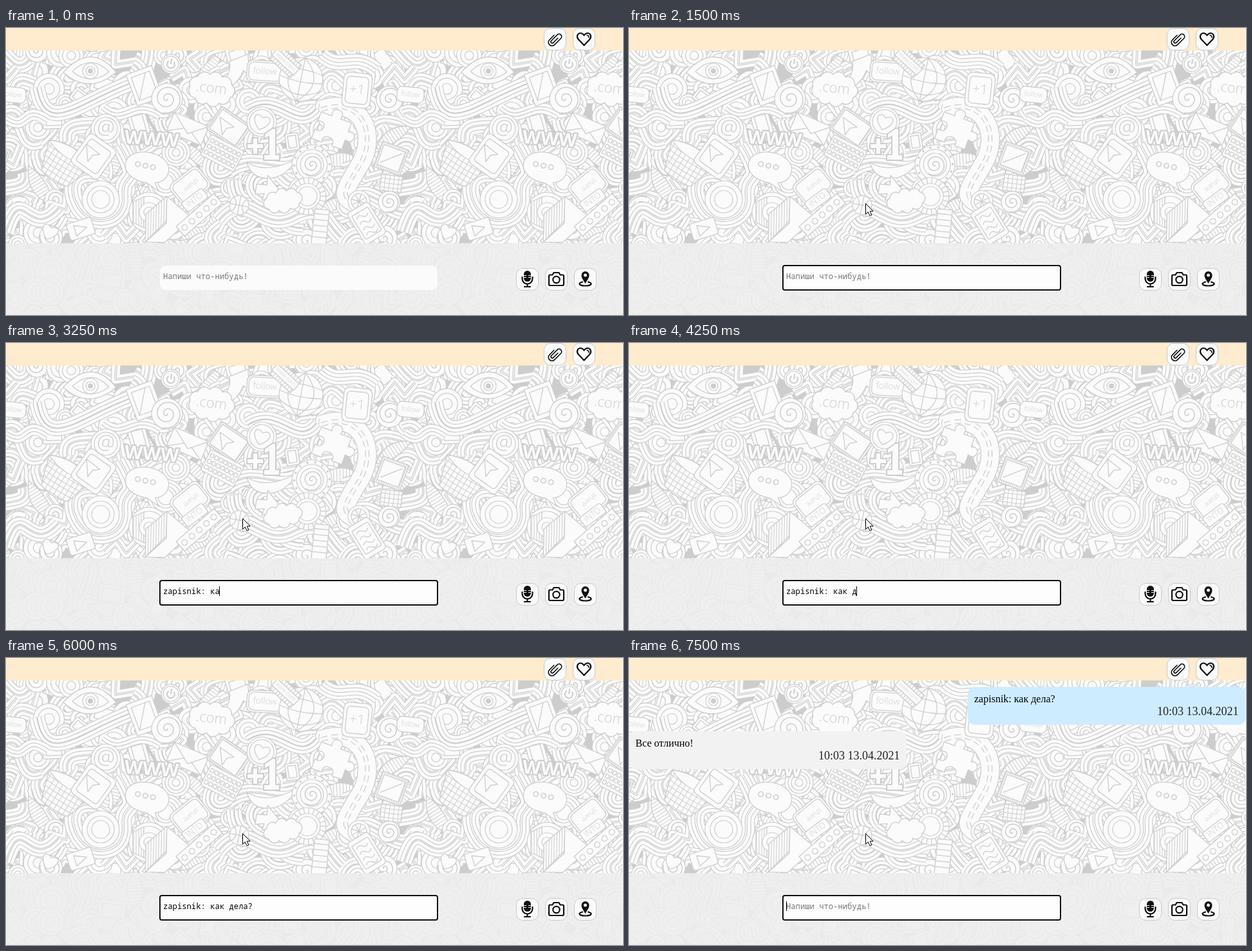
An HTML page with a canvas for the animation above (8 s loop, 958 by 447 pixels).

```html
<!DOCTYPE html>
<html lang="ru">
<head>
<meta charset="utf-8">
<style>
  html, body { margin: 0; width: 100%; height: 100%; overflow: hidden; background: #fbfbfb; }
  canvas, svg { position: absolute; left: 0; top: 0; display: block; }
  .mono { font: 12.2px "Noto Sans Mono", monospace; white-space: pre; }
  .serif { font: 16px "Liberation Serif", serif; }
  .time { font-size: 18px; fill: #222; text-anchor: end; }
  .line { fill: none; stroke: #111; stroke-width: 2.2; stroke-linecap: round; stroke-linejoin: round; }
  .thin { stroke-width: 1.6; }
</style>
</head>
<body>
<canvas id="doodles" width="957" height="447"></canvas>
<svg width="958" height="447" viewBox="0 0 958 447">
  <defs>
    <rect id="button" x=".5" y=".5" width="34" height="34" rx="10" fill="#fafafa" stroke="#c9c9c9"/>
  </defs>
  <rect width="957" height="35" fill="#ffebcd"/>
  <rect y="335" width="957" height="112" fill="#eee" opacity=".9"/>

  <g transform="translate(835 0)">
    <use href="#button"/>
    <path class="line thin" transform="translate(17 18) rotate(45)"
      d="M-5.500-4V6a5.500 5.500 0 0 0 11 0V-8a4 4 0 0 0-8 0V5a2.200 2.200 0 0 0 4.400 0V-5"/>
  </g>
  <g transform="translate(880 0)">
    <use href="#button"/>
    <path class="line" d="M17.500 27L8.500 17.500C5 13 8 8 12 8C15 8 16.500 10 17.500 11.500C18.500 10 20 8 23 8C27 8 30 13 26.500 17.500Z"/>
    <path class="line thin" d="M22 11.300q3 .5 3 3.500"/>
  </g>
  <g transform="translate(792 374)">
    <use href="#button"/>
    <rect x="12" y="4" width="11" height="17" rx="5.500" fill="#111"/>
    <path d="M12 11.500h4M19 11.500h4M12 14.500h4M19 14.500h4" stroke="#fafafa"/>
    <path class="line" d="M9.500 14v2.500a8 8 0 0 0 16 0V14M17.500 25v4M13 29h9"/>
  </g>
  <g transform="translate(837 374)">
    <use href="#button"/>
    <path class="line" d="M8 10.500h3.500l2-3.500h8l2 3.500H27q2 0 2 2V25q0 2-2 2H8q-2 0-2-2V12.500q0-2 2-2z"/>
    <circle class="line" cx="17.500" cy="18" r="5.200"/>
  </g>
  <g transform="translate(882 374)">
    <use href="#button"/>
    <path class="line" d="M13 21.500c-8 2-5 6 4.500 6s12.500-4 4.500-6"/>
    <path fill="#111" fill-rule="evenodd" d="M17.500 24C14 18 11.500 15 11.500 11a6 6 0 0 1 12 0C23.500 15 21 18 17.500 24ZM15 11a2.500 2.500 0 0 0 5 0a2.500 2.500 0 0 0-5 0Z"/>
  </g>

  <rect id="idle" x="239" y="370" width="431" height="38" rx="9" fill="#fbfbfb"/>
  <rect id="focus" x="239" y="370" width="431" height="38" rx="3" fill="#fdfdfd" stroke="#101010" stroke-width="2"/>
  <text id="field" class="mono" x="244" y="391"></text>
  <rect id="caret" y="379" width="1" height="15"/>

  <g id="chat" class="serif">
    <rect x="526" y="45" width="431" height="59" rx="10" fill="#ceecff"/>
    <text x="536" y="69">zapisnik: как дела?</text>
    <text class="time" x="946.500" y="89">10:03 13.04.2021</text>
    <rect y="114" width="431" height="59" rx="10" fill="#f2f2f2"/>
    <text x="10" y="138">Все отлично!</text>
    <text class="time" x="420.500" y="158">10:03 13.04.2021</text>
  </g>
  <path id="pointer" d="M.5.5V17L4.300 13.400L7 19.500L9.800 18.300L7.200 12.300H12Z" fill="#fff" stroke="#000"/>
</svg>
<script>
const $ = id => document.getElementById(id);
const c = $('doodles').getContext('2d');
const INK = '#cdcdcd', PAPER = '#fbfbfb', TILE = 618;

let seed = 11;
const rnd = (a = 1, b = 0) => b + (a - b) * ((seed = seed * 16807 % 2147483647) / 2147483647);

// Every motif is repeated once per wallpaper tile.
function put(x, y, angle, draw) {
  for (const dx of [-TILE, 0, TILE]) {
    c.save();
    c.translate(x + dx, y);
    c.rotate(angle);
    draw();
    c.restore();
  }
}
const asPath = p => typeof p === 'string' ? new Path2D(p) : p;
function line(p, width = 1.3, color = INK) {
  c.strokeStyle = color;
  c.lineWidth = width;
  c.stroke(asPath(p));
}
function outline(p, width) {
  c.fillStyle = PAPER;
  c.fill(asPath(p));
  line(p, width);
}
function disc(x, y, r, color = INK) {
  c.fillStyle = color;
  c.beginPath();
  c.arc(x, y, r, 0, 7);
  c.fill();
}
function rings(...radii) {
  for (const r of radii) { disc(0, 0, r + .6); disc(0, 0, r - .6, PAPER); }
}
function box(w, h, r = 0) {
  const p = new Path2D();
  p.roundRect(-w / 2, -h / 2, w, h, r);
  return p;
}
// A striped ribbon: nested strokes in alternating tones.
function tube(p, width) {
  p = asPath(p);
  for (let w = width, dark = true; w > 0; w -= dark ? 2.4 : 9, dark = !dark) line(p, w, dark ? INK : PAPER);
}
function hatch(p, step = 4) {
  p = asPath(p);
  outline(p);
  c.save();
  c.clip(p);
  for (let x = -80; x < 80; x += step) line(`M${x} -80V80`, 1);
  c.restore();
}
function mesh(p, step) {
  hatch(p, step);
  c.save();
  c.clip(asPath(p));
  for (let y = -60; y < 60; y += step) line(`M-60 ${y}Q0 ${y + 9} 60 ${y}`, 1);
  c.restore();
}
function spiral(r, turns = 2.3) {
  const p = new Path2D();
  for (let a = 0; a < turns * 6.283; a += .2) {
    const k = r * a / (turns * 6.283);
    p.lineTo(k * Math.cos(a), k * Math.sin(a));
  }
  return p;
}
function curl(r) { rings(r); line(spiral(r - 1), 1.5); }
function cloud(rx, ry, bumps, r) {
  for (const inset of [0, 1.4]) {
    const color = inset ? PAPER : INK;
    for (let i = 0; i < bumps; i++) {
      const a = i / bumps * 6.283;
      disc(rx * Math.cos(a), ry * Math.sin(a), r - inset, color);
    }
    c.beginPath();
    c.ellipse(0, 0, rx, ry, 0, 0, 7);
    c.fill();
  }
}
function label(text, size, bold) {
  c.font = `${bold ? 'bold' : 300} ${size}px "Open Sans", sans-serif`;
  c.textAlign = 'center';
  c.textBaseline = 'middle';
  if (bold) { c.strokeStyle = INK; c.lineWidth = 4; c.strokeText(text, 0, 0); }
  c.fillStyle = bold ? PAPER : INK;
  c.fillText(text, 0, 0);
}
const heart = 'M0 13C-20 -1 -12 -16 0 -6C12 -16 20 -1 0 13Z';
const arrow = 'M-10 -13L13 0L2 3L-4 14Z';

const fillers = [
  r => rings(r, r * .7, r * .35),
  r => curl(r),
  r => tube(`M${-2 * r} 0C${-r} ${-2 * r} ${r} ${2 * r} ${2 * r} 0`, 26),
  r => tube(`M${-r} ${r}C${-r} ${-r} ${r} ${-r} ${r} ${r}`, 25),
  r => hatch(`M${-1.6 * r} 0Q0 ${-r * 1.3} ${1.6 * r} 0Q0 ${r * .7} ${-1.6 * r} 0`, 5),
  r => tube(`M${-1.5 * r} 0L${-r * .4} ${-r * .7}L${r * .1} ${r * .5}L${1.4 * r} ${-r * .4}`, 15),
  r => { outline(box(r * 1.7, r * 1.3, 3)); outline(box(r * 1.2, r * .8)); }
];

function wallpaper() {
  c.fillStyle = INK;
  c.fillRect(0, 0, 957, 447);
  c.lineJoin = 'round';
  // Two passes over a jittered grid leave only small solid gaps.
  const cols = 19, rows = 14, count = cols * rows;
  for (let i = 0; i < count * 2; i++) {
    const k = i * 89 % count, r = rnd(25, 14);
    const kind = fillers[Math.floor(rnd(fillers.length))];
    put((k % cols + rnd()) * TILE / cols, (Math.floor(k / cols) + rnd()) * 34, rnd(6.283), () => kind(r));
  }

  // Long ribbons that weave through the tile.
  for (const [path, width] of [
    ['M48 92C62 175 118 110 205 82', 25],
    ['M176 182C215 250 178 220 182 262S130 315 110 275S120 215 155 235', 27],
    ['M0 318C25 235 35 335 82 280', 26],
    ['M345 222C395 185 425 245 478 190', 26],
    ['M375 128C425 95 450 165 482 125', 25],
    ['M330 300C375 245 395 320 445 294S495 305 520 326', 26],
    ['M150 125C185 155 195 105 240 135', 18],
    ['M575 65C540 35 520 70 490 42', 24],
    ['M0 140C35 165 25 115 65 145', 18]
  ]) put(0, 0, 0, () => tube(path, width));

  put(0, 0, 0, () => {
    const road = new Path2D('M490 127C550 105 578 165 550 212S518 262 548 276');
    line(road, 30);
    line(road, 27.500, PAPER);
    c.setLineDash([10, 6]);
    line(road, 7);
    line(road, 4.500, PAPER);
    c.setLineDash([]);
  });

  put(131, 67, .05, () => {
    outline('M-42 4Q0 -46 40 0Q0 38 -42 4');
    outline('M-28 2Q0 -28 29 0Q0 24 -28 2');
    rings(12, 7); disc(0, 0, 4);
  });
  put(256, 56, .15, () => { rings(15, 12); line('M-4 -4A6 6 0 1 0 4 -4M0 -8V0', 2); });
  put(215, 90, -.35, () => { outline(box(42, 52)); outline(box(30, 38)); line('M-15 19L8 -19'); });
  put(250, 110, 0, () => curl(24));
  put(354, 72, .5, () => outline('M-12 36Q-2 0 -16 -14L4 -38L22 -10L10 -12Q14 20 -12 36Z'));
  put(319, 95, .12, () => { cloud(25, 16, 9, 12); label('.com', 22); });
  put(402, 68, .06, () => { outline(box(56, 34, 9)); outline(box(50, 28, 7)); label('follow', 14); });
  put(628, 104, .1, () => { outline(box(42, 24, 8)); label('follow', 11); });
  put(458, 80, .2, () => {
    rings(34);
    for (const k of [-20, 0, 20]) line(`M0 -34Q${k * 2} 0 0 34M-34 ${k * .6}Q0 ${k * 1.4 + 8} 34 ${k * .6}`);
  });
  put(434, 53, .75, () => { hatch(box(44, 26), 5); outline(box(46, 13)); label('www.com', 9); });
  put(545, 97, .1, () => { outline(box(44, 54, 9)); outline(box(34, 42, 6)); label('+1', 21); });

  put(155, 157, .1, () => { rings(23, 18); label('@', 31); });
  put(91, 208, .55, () => { mesh('M-38 -16Q0 -34 38 -16L25 30Q0 40 -24 30Z', 8); outline('M-38 -16Q0 -34 38 -16Q0 2 -38 -16Z'); });
  put(136, 200, .62, () => { outline(box(52, 56, 7)); outline(box(40, 42, 5)); });
  put(133, 195, .15, () => outline(arrow));
  put(264, 194, 0, () => rings(22, 17, 12, 6));
  put(282, 157, .4, () => { outline(box(58, 32, 2)); line('M-29 -16L3 7L29 -16M-29 16L-5 1M29 16L8 3'); });
  put(226, 175, .07, () => label('WWW', 29, true));
  put(248, 240, 0, () => { rings(28, 23); rings(17, 12); });
  put(219, 217, .2, () => {
    outline('M-34 0C-34 -31 34 -31 34 0C34 13 25 19 17 21L25 33L5 24C-20 25 -34 14 -34 0Z');
    for (const x of [-15, -3, 9]) { disc(x, -2, 4.500); disc(x, -2, 3, PAPER); }
  });
  put(147, 267, 0, () => rings(29, 21, 14));
  put(222, 287, 0, () => { rings(31, 25); hatch('M-25 -16L-8 -24V24L-25 16Z'); rings(15, 8); });
  put(245, 300, .02, () => { hatch('M-28 -10L4 -38V0L-28 34Z'); outline('M4 -38L44 -5L2 34L-28 34L4 4Z'); });
  put(286, 246, -.68, () => { outline(box(56, 42, 9)); outline(box(49, 35, 7)); });
  put(287, 244, 2.450, () => label('share', 11));
  put(293, 268, -.65, () => { outline(box(40, 18, 4)); label('INTO', 13); });
  put(300, 291, -.72, () => {
    outline(box(78, 20));
    for (let x = -30; x < 36; x += 15) { disc(x, 0, 5); disc(x, 0, 3.700, PAPER); }
  });
  put(68, 317, .4, () => outline(heart));
  put(116, 313, -.3, () => { outline(box(40, 27, 4)); outline('M-9 -8L10 0L-9 9Z'); });

  put(346, 155, .6, () => { hatch(box(56, 43, 3), 3); outline(box(48, 36, 2)); });
  put(341, 153, .1, () => outline(arrow));
  put(336, 195, .48, () => {
    outline(box(58, 36, 3));
    for (let i = 0; i < 21; i++) {
      c.save();
      c.translate(-23 + i % 7 * 7.700, -10 + Math.floor(i / 7) * 10);
      outline(box(5.500, 6, 1));
      c.restore();
    }
  });
  put(397, 146, .3, () => { rings(23, 19); outline(heart); });
  put(404, 217, 0, () => outline('M-30 -8Q0 12 48 -14Q30 18 0 17Q-24 16 -30 -8Z'));
  put(387, 184, 0, () => outline('M-4 -13H4V-4H13V4H4V13H-4V4H-13V-4H-4Z', 2));
  put(412, 181, 0, () => outline('M-11 -16L2 -25H7V16H13V25H-12V16H-4V-12L-11 -8Z', 2));
  put(475, 213, .4, () => {
    rings(31, 24);
    for (let a = 0; a < 6.2; a += .45) disc(27.500 * Math.cos(a), 27.500 * Math.sin(a), 1.700);
    curl(18);
  });
  put(506, 158, .35, () => outline('M-25 -20H-7C-14 -36 14 -36 7 -20H25V-5C41 -12 41 14 25 8V24H8C14 9 -14 9 -8 24H-25V8C-9 14 -9 -12 -25 -5Z'));
  put(408, 252, .15, () => outline('M-20 -6L-4 -7L-5 -22L22 3L-8 18L-6 7L-20 10Z'));
  put(468, 262, 0, () => {
    rings(29, 20);
    for (let a = 0; a < 6.2; a += .3) {
      const x = Math.cos(a), y = Math.sin(a);
      line(`M${x * 20} ${y * 20}L${x * 29} ${y * 29}`);
    }
    rings(15);
  });
  put(430, 269, -.2, () => cloud(21, 10, 8, 10));
  put(362, 276, .2, () => { rings(15); line('M-15 0H15M0 -15V15M-10 -11Q0 0 -10 11M10 -11Q0 0 10 11'); });
  put(548, 270, .3, () => { rings(17, 12); line('M-12 0H12M0 -12V12M-8 -8L8 8M8 -8L-8 8'); });
  put(560, 304, -.55, () => {
    outline(box(38, 57, 5)); outline(box(29, 42, 2));
    for (const y of [-13, -3, 7, 16]) line(`M-10 ${y}q5 -6 10 0t10 0`);
  });
  put(595, 271, 0, () => curl(17));
  put(598, 203, .35, () => { hatch(box(43, 42, 2), 3); outline(box(35, 33)); line('M-14 12L14 -13'); });
  put(598, 242, .12, () => mesh(box(33, 25, 2), 7));
  put(488, 310, .1, () => { outline(box(23, 55)); for (let y = -20; y < 25; y += 9) line(`M-11 ${y}H11`); });
}
wallpaper();

const MESSAGE = 'zapisnik: как дела?', HINT = 'Напиши что-нибудь!';
const LOOP = 8000, FOCUS = 750, SENT = 6250, ADVANCE = 7.320;
// [time, letters typed]; each entry restarts the caret blink.
const keys = [[FOCUS, 0], [1750, 10], [3000, 11], [3250, 12], [3750, 13],
  [4000, 14], [4250, 15], [4500, 16], [4750, 18], [5500, 19]];
const show = (id, on) => $(id).setAttribute('visibility', on ? 'visible' : 'hidden');

function render(t) {
  const [pressed, typed] = keys.findLast(([time]) => time <= t) || [0, 0];
  const length = t < SENT ? typed : 0;
  const focused = t >= FOCUS;
  $('field').textContent = length ? MESSAGE.slice(0, length) : HINT;
  $('field').setAttribute('fill', length ? '#000' : '#757575');
  $('caret').setAttribute('x', Math.floor(244 + length * ADVANCE));
  show('caret', focused && (t - pressed) % 1000 < 500);
  show('idle', !focused);
  show('focus', focused);
  show('chat', t >= SENT);
  show('pointer', t >= 1250);
  $('pointer').setAttribute('transform', t < 1500 ? 'translate(382 335)' : 'translate(367 273)');
}
const start = performance.now();
function tick() {
  render((performance.now() - start) % LOOP);
  requestAnimationFrame(tick);
}
tick();
</script>
</body>
</html>
```
